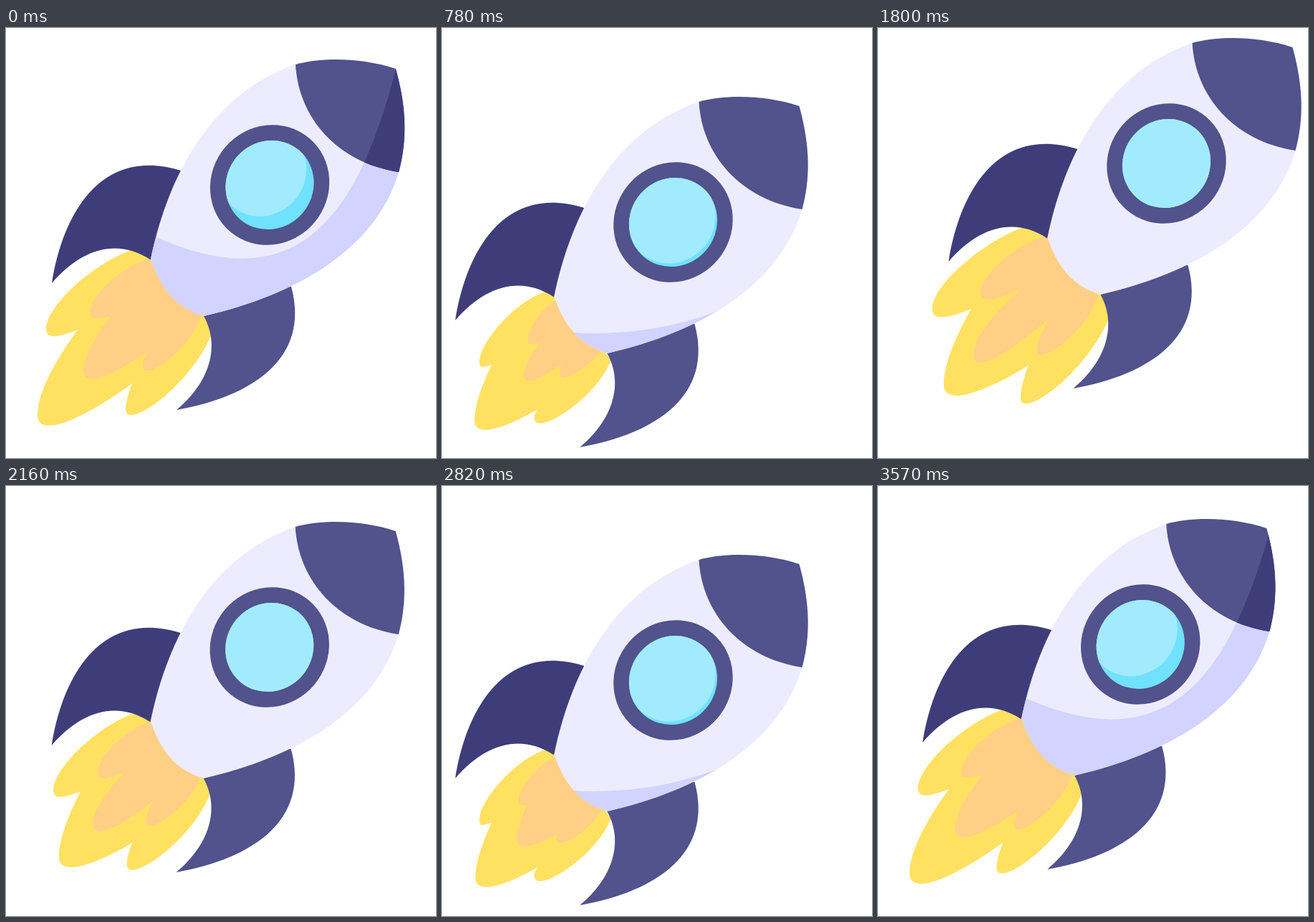
An HTML page with a canvas that plays this animation: 600x600 px, repeating every 3600 ms.

```html
<!DOCTYPE html>
<html>
<head>
<meta charset="utf-8">
<style>
  html, body { margin: 0; width: 100%; height: 100%; overflow: hidden; background: #fff; }
  canvas { display: block; }
</style>
</head>
<body>
<canvas id="stage" width="600" height="600"></canvas>
<script>
const ctx = document.getElementById('stage').getContext('2d');
const LOOP = 3600, QUARTER = LOOP / 4, STEP = 30;
const WHITE = '#fff', NAVY = '#3f3d79', INDIGO = '#52528c';

const tip = 'C440 41 495 41 544 57C560 115 559 160 548 201';
const nose = new Path2D(`M404 51${tip}C462 188 408 125 404 51Z`);
const body = new Path2D(`M202 322C222 225 275 95 404 51${tip}C515 310 405 372 276 402C238 391 215 363 202 322Z`);
const leftFin = new Path2D('M64 356C80 255 135 165 244 199L270 300L201 323C155 293 105 308 64 356Z');
const rightFin = new Path2D('M276 402C302 450 278 500 238 533C345 514 425 460 398 361L330 340Z');

// One key per quarter of the loop, joined linearly.
const travel = [[0, 0], [-52.5, 60], [34.5, -30], [-52.5, 60]];

// Outline: start, tip, notch, tip, notch, tip, end.
// Reach: how far side tips, middle tip and notches stand from the root.
const outerFlame = {
  color: '#ffe162',
  root: [190, 402],
  outline: [[200, 303], [56, 420], [100, 421], [44, 540], [176, 496], [167, 532], [292, 412]],
  reach: [[1, 1, 1], [0.64, 0.63, 0.81], [1.11, 0.91, 1.05], [0.64, 0.62, 0.81]]
};
const innerFlame = {
  color: '#ffcf86',
  root: [238, 363],
  outline: [[203, 322], [117, 396], [146, 402], [108, 478], [197, 452], [191, 472], [272, 402]],
  reach: [[1, 1, 1], [0.54, 0.54, 0.55], [1.07, 1.07, 0.8], [0.66, 0.63, 0.78]]
};

// Upper edge of the body shade, deep and then flattened.
const deepEdge = [210, 292, 400, 376, 488, 276, 544, 57];
const flatEdge = [216, 385, 331, 381, 456, 371, 655, 245];

const mix = (from, to, k) => from.map((v, i) => v + (to[i] - v) * k);

function pose(keys, t) {
  const i = Math.floor(t / QUARTER);
  return mix(keys[i], keys[(i + 1) % 4], t / QUARTER - i);
}

function fill(path, color) {
  ctx.fillStyle = color;
  ctx.fill(path);
}

function fillInside(clip, path, color) {
  ctx.save();
  ctx.clip(clip);
  fill(path, color);
  ctx.restore();
}

// Ovals lean along the rocket.
function oval(x, y, long, short) {
  const path = new Path2D();
  path.ellipse(x, y, long, short, -0.87, 0, 7);
  return path;
}

function drawFlame({ color, root, outline, reach }, t) {
  const [side, middle, notch] = pose(reach, t), ends = (2 + side) / 3;
  const scale = [ends, side, notch, middle, notch, side, ends];
  const points = outline.map((p, i) => mix(root, p, scale[i]));
  const path = new Path2D();
  path.moveTo(...points[0]);
  for (let i = 0; i < 6; i += 2) {
    const [[x, y], [tx, ty], [nx, ny]] = points.slice(i, i + 3);
    const dx = nx - tx, dy = ny - ty, bend = i ? 0.28 : 0.08;
    path.bezierCurveTo(x + 0.43 * (tx - x), y + bend * (ty - y), tx, ty - 0.3 * (ty - y), tx, ty);
    const [hx, hy] = i < 4 ? [0.5 * dx, 0.2 * dx - 0.5 * dy] : [0.17 * dx, -0.65 * dy];
    path.bezierCurveTo(tx, ty + 0.2 * dx + 8, nx - hx, ny + hy, nx, ny);
  }
  path.closePath();
  fill(path, color);
}

function shadeArea(age) {
  const [x, y, ...curve] = mix(deepEdge, flatEdge, Math.min(1, age / QUARTER));
  const drop = Math.max(0, age - QUARTER) * 0.057;
  const path = new Path2D();
  path.moveTo(x, y);
  path.bezierCurveTo(...curve);
  path.lineTo(700, 700);
  path.lineTo(100, 700);
  path.lineTo(100, y);
  const moved = new Path2D();
  moved.addPath(path, new DOMMatrix().translate(0, drop));
  return moved;
}

function draw(t) {
  const age = Math.min(t, LOOP - t);
  ctx.fillStyle = WHITE;
  ctx.fillRect(0, 0, 600, 600);
  ctx.save();
  ctx.translate(...pose(travel, t));

  drawFlame(outerFlame, t);
  drawFlame(innerFlame, t);
  fill(leftFin, NAVY);
  fill(rightFin, INDIGO);

  const shade = shadeArea(age);
  fill(body, '#edecff');
  fillInside(body, shade, '#d2d3ff');
  fill(nose, INDIGO);
  fillInside(nose, shade, NAVY);

  const glass = oval(368, 219, 63.3, 60.3);
  const glint = Math.max(0, 1 - age / 1080);
  fill(oval(368, 219, 85.5, 81.5), INDIGO);
  fill(glass, '#70e1ff');
  fillInside(glass, oval(368 - 11 * glint, 219 - 19 * glint, 64, 61), '#a2ebff');
  ctx.restore();
}

const start = performance.now();
function tick() {
  const t = (performance.now() - start) % LOOP;
  draw(Math.floor(t / STEP) * STEP);
  requestAnimationFrame(tick);
}
tick();
</script>
</body>
</html>
```
